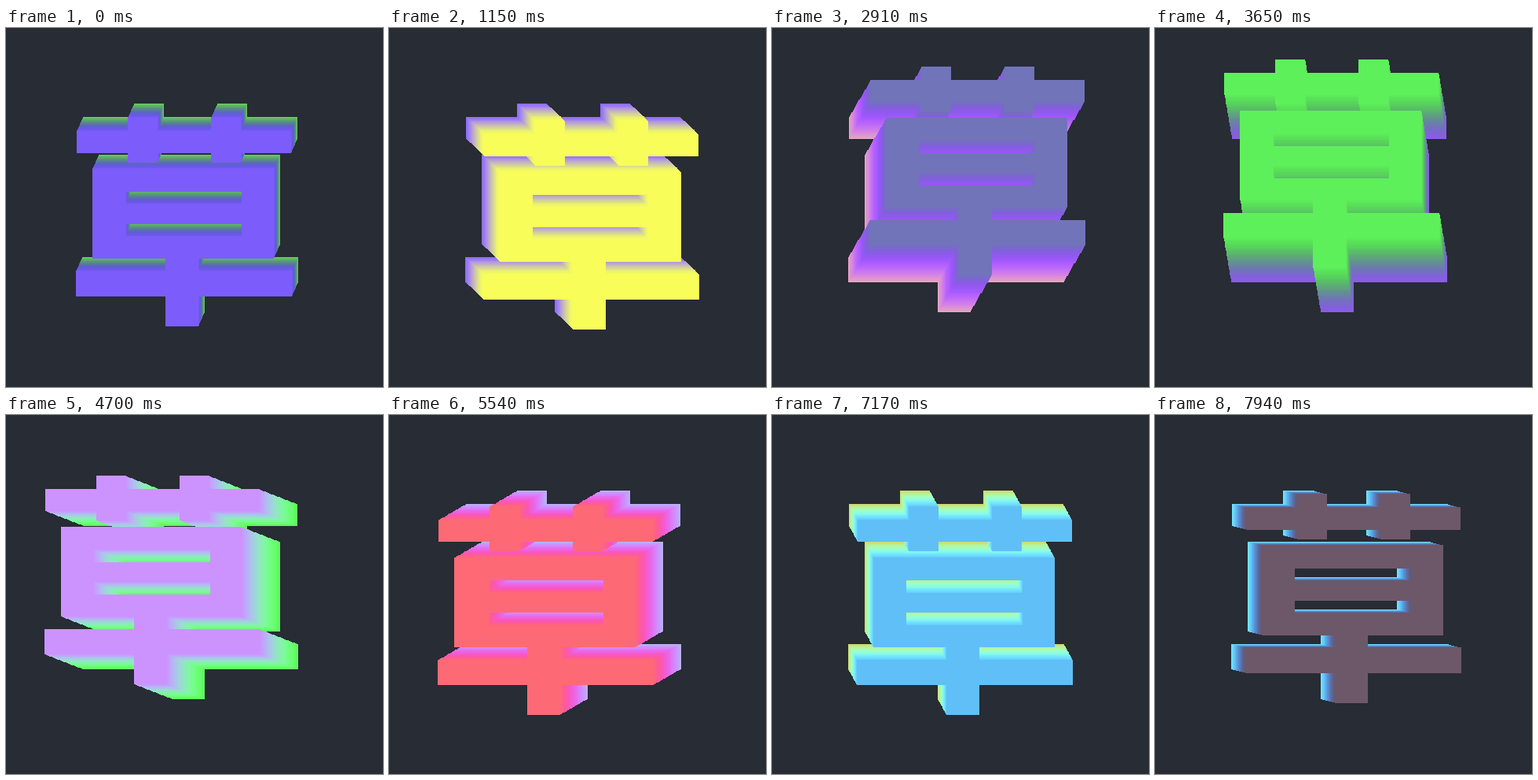
An HTML page with a canvas for the animation above (8 s loop, 480 by 456 pixels).

```html
<!DOCTYPE html>
<html lang="zh">
<head>
<meta charset="utf-8">
<title>草</title>
<style>
  html, body { margin: 0; height: 100%; overflow: hidden; background: #282c34; }
  canvas { display: block; }
</style>
</head>
<body>
<canvas id="stage" width="480" height="456"></canvas>
<script>
const LOOP = 8000;
const TRAIL = 1000;   // age in ms of the colour on the rearmost layer
const LAYERS = 24;
const ctx = document.getElementById('stage').getContext('2d');

// Strokes of the character as left, top, right, bottom; left > right cuts a hole.
const glyph = new Path2D();
for (const [left, top, right, bottom] of [
  [98, 113, 371, 141],
  [163, 96, 201, 153],
  [269, 96, 307, 153],
  [118, 161, 349, 275],
  [308, 190, 160, 206],
  [308, 231, 160, 247],
  [97, 291, 372, 323],
  [211, 265, 253, 361]
]) glyph.rect(left, top, right - left, bottom - top);

// Offset of the front face at even intervals over the loop
const driftX = [-8, 12.3, 36, 43, 14.5, -27, -48.5, -33, -7, 11.5, 18.7];
const driftY = [18, 25, 12, -25, -55, -50, -14, 21.5, 27.5, 20, 4];

// Catmull-Rom curve through evenly spaced values
function curve(values, progress) {
  const last = values.length - 1;
  const i = Math.floor(progress * last), u = progress * last - i;
  const [p, a, b, n] = [-1, 0, 1, 2].map(k => values[Math.min(last, Math.max(0, i + k))]);
  return a + u / 2 * (b - p + u * (2 * p - 5 * a + 4 * b - n + u * (3 * (a - b) + n - p)));
}

// Each channel swings at its own rate; older colours drift towards the back.
function colourAt(time) {
  const wave = (peak, rate) =>
    Math.round(171 + 83 * Math.cos(2 * Math.PI * rate * (time - peak) / 8100));
  return `rgb(${wave(1400, 2)}, ${wave(1200, 3)}, ${wave(80, 3.5)})`;
}

function draw() {
  const time = performance.now() % LOOP;
  const x = curve(driftX, time / LOOP), y = curve(driftY, time / LOOP);
  ctx.fillStyle = '#282c34';
  ctx.fillRect(0, 0, 480, 456);
  for (let layer = 0; layer <= LAYERS; layer++) {
    const depth = layer / LAYERS;
    ctx.setTransform(1, 0, 0, 1, Math.round(x * depth), Math.round(y * depth));
    ctx.fillStyle = colourAt(time - TRAIL * (1 - depth));
    ctx.fill(glyph);
  }
  ctx.resetTransform();
  requestAnimationFrame(draw);
}
draw();
</script>
</body>
</html>
```
